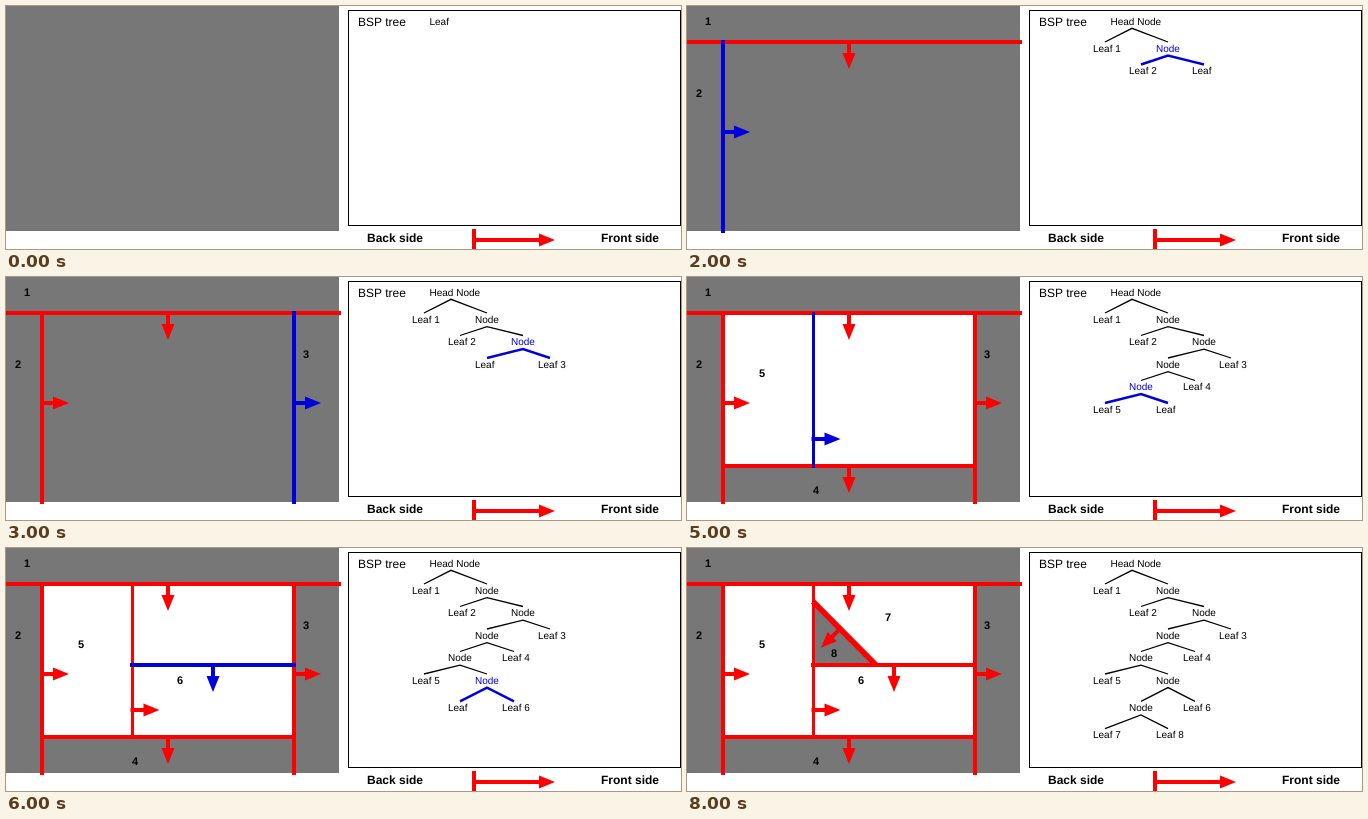
An HTML page for the animation above (10 s loop, 675 px wide and 243 px high).

```html
<!DOCTYPE html>
<html lang="en">
<head>
<meta charset="utf-8">
<title>BSP tree construction</title>
<style>
html, body { margin: 0; width: 100%; height: 100%; overflow: hidden; background: #fff; }
svg { display: block; font: 10px "Liberation Sans", Arial, sans-serif; text-rendering: geometricPrecision; }
.big { font-size: 12px; }
.bold { font-weight: bold; }
.digit { font-size: 11px; font-weight: bold; text-anchor: middle; }
</style>
</head>
<body>
<svg id="stage" width="675" height="243" viewBox="0 0 675 243"></svg>
<script>
const RED = '#f00', BLUE = '#00d', GREY = '#777', BLACK = '#000';
const PEN = 4;
const stage = document.getElementById('stage');

// Room edges, and the lines that divide its inside
const left = 36, right = 288, top_ = 36, bottom = 189, midX = 126.5, midY = 117;
const notch = 63;

const text = (x, y, s, cls = '', fill = BLACK) =>
  `<text x="${x}" y="${y}" class="${cls}" fill="${fill}">${s}</text>`;
const line = (points, width, color) =>
  `<polyline points="${points}" fill="none" stroke="${color}" stroke-width="${width}"/>`;
const rect = (x, y, w, h, fill, stroke = 'none') =>
  `<rect x="${x}" y="${y}" width="${w}" height="${h}" fill="${fill}" stroke="${stroke}"/>`;
const arrow = (x, y, angle, length, color) =>
  `<path transform="translate(${x} ${y}) rotate(${angle})" fill="${color}"
    d="M-2 -2H${length - 15}V2H-2ZM${length - 16} -6.5L${length} 0L${length - 16} 6.5Z"/>`;

// The front side lies clockwise of the wall's direction; `at` places the arrow along it.
function wall(x1, y1, x2, y2, at = 0.5, pen = PEN) {
  const dx = x2 - x1, dy = y2 - y1;
  const width = pen * (Math.abs(dx) + Math.abs(dy)) / Math.hypot(dx, dy);
  const angle = Math.atan2(dy, dx) * 180 / Math.PI + 90;
  return color => line([x1, y1, x2, y2], width, color) +
    arrow(x1 + dx * at, y1 + dy * at, angle, 27, color);
}
const across = (x1, x2, y) => wall(x1, y, x2, y);
const upright = x => wall(x, 227, x, top_ - 2, 0.523);

const walls = [
  across(-11, 335, top_),
  upright(left),
  upright(right),
  across(left - 2, right + 2, bottom),
  wall(midX, bottom + 2, midX, top_ - 1, 0.186, 3),
  across(midX - 2.5, right + 2, midY),
  wall(midX - 0.5, midY - notch - 0.5, midX + notch - 0.5, midY, 0.43)
];
const digits = [[21, 19], [12, 91], [300, 81], [129, 217], [75, 100], [174, 136], [201, 73], [147, 109]];
const digit = i => text(...digits[i], i + 1, 'digit');

function drawMap(step) {
  let out = rect(0, 0, 333, 225, GREY);
  if (step > 3) out += rect(left, top_, right - left, bottom - top_, '#fff');
  if (step > 6) out += `<path d="M${midX} ${midY}v${-notch}l${notch} ${notch}z" fill="${GREY}"/>` + digit(7);
  walls.slice(0, step).forEach((drawWall, i) => {
    out += drawWall(i === step - 1 ? BLUE : RED) + digit(i);
  });
  return out;
}

function drawTree(step) {
  const turns = 'RRLLRL'; // the child that is split next
  let out = '', x = 445, y = 18.5;
  for (let i = 0; i <= Math.min(step, walls.length - 1); i++) {
    const pending = i === step, active = i === step - 1;
    const name = pending ? 'Leaf' : i ? 'Node' : 'Head Node';
    out += text(x - (i ? 12 : 21.5), y, name, '', active ? BLUE : BLACK);
    if (pending) break;

    const nextY = y + (i < 1 || i > 4 ? 27.3 : 22.5);
    const child = { L: x - (i && i % 2 === 0 ? 36 : 27), R: x + (i < 2 ? 36 : 27) };
    out += line([child.L, nextY - 9.8, x, y + 3.8, child.R, nextY - 9.8],
      active ? 2.5 : 1.3, active ? BLUE : BLACK);
    let number = i + 1;
    for (const side of 'LR') {
      if (side !== turns[i]) out += text(child[side] - 12, nextY, 'Leaf ' + number++);
    }
    x = child[turns[i]];
    y = nextY;
  }
  return out;
}

function draw(step) {
  stage.innerHTML = drawMap(step) +
    rect(342.5, 4.5, 332, 215, '#fff', BLACK) +
    text(352, 20, 'BSP tree', 'big') + drawTree(step) +
    text(361, 235.5, 'Back side', 'big bold') + text(595, 235.5, 'Front side', 'big bold') +
    line([468, 223, 468, 243], PEN, RED) + arrow(468, 234, 0, 81, RED);
}

let shown = -1;
const start = performance.now();
function tick() {
  const time = (performance.now() - start) % 10000;
  const step = Math.min(8, Math.floor(time / 1000));
  if (step !== shown) draw(shown = step);
  requestAnimationFrame(tick);
}
tick();
</script>
</body>
</html>
```
